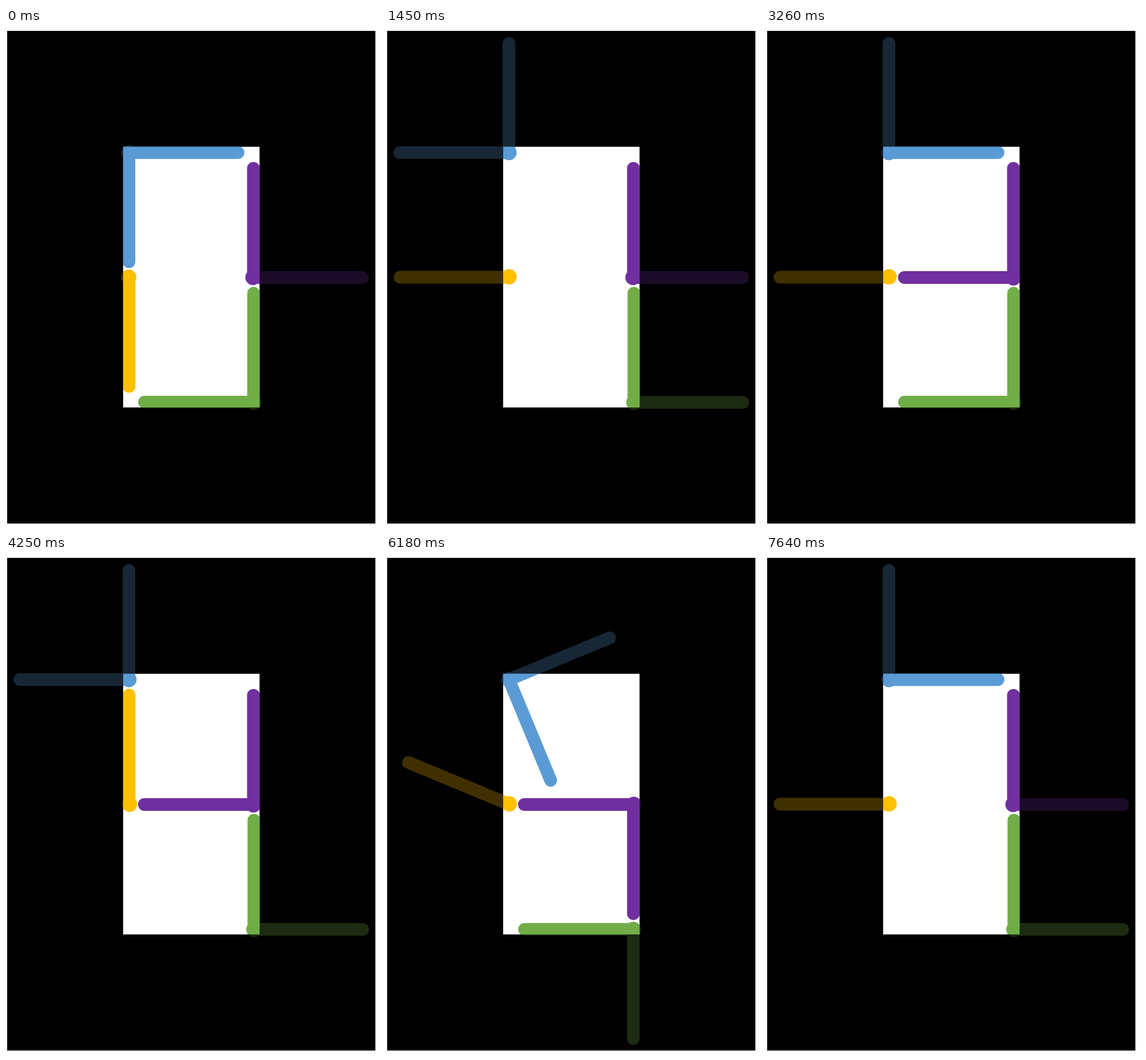
Recreate the animation shown at these times as an HTML page. Size 648 by 864 pixels, loop 8 s.

```html
<!DOCTYPE html>
<html lang="en">
<head>
<meta charset="utf-8">
<title>Rotating arm digits</title>
<style>
  html, body { margin: 0; width: 100%; height: 100%; overflow: hidden; background: #fff; }
  svg { display: block; width: 648px; height: 864px; }
  path { fill: none; stroke: currentColor; stroke-width: 22; stroke-linecap: round; stroke-linejoin: round; }
  circle { fill: currentColor; }
  .mask { fill: #000; fill-opacity: .75; stroke: none; }
</style>
</head>
<body>
<svg viewBox="0 0 648 864">
  <rect x="2" y="5" width="638" height="853"/>
  <rect x="203" y="205.5" width="236.5" height="451.5" fill="#fff"/>
  <g transform="translate(213 215.7)" color="#5b9bd5">
    <g id="blue"><path d="M0-189V0H-189"/><circle r="13.3"/></g>
  </g>
  <g transform="translate(213.3 431.5)" color="#ffc000">
    <g id="yellow"><path d="M0 0H-189"/><circle cy="-.7" r="13.3"/></g>
  </g>
  <g transform="translate(428.7 431.9)" color="#7030a0">
    <g id="purple"><path d="M0-189V0H189"/><circle cx="-.7" r="13.3"/></g>
  </g>
  <g transform="translate(429 648.3)" color="#70ad47">
    <g id="green"><path d="M.5-189V0H189"/><circle cx=".5" r="13.3"/></g>
  </g>
  <path class="mask" d="M2 5H640V858H2ZM203 205.5V657H439.5V205.5Z"/>
</svg>
<script>
const LOOP = 8000, HOLD = 40, QUARTER = 200; // ms; a quarter turn takes QUARTER
const names = ["blue", "yellow", "purple", "green"];

// Lit segments of the digits 0 to 7: a to f run clockwise from the top, g is the middle
const digits = ["abcdef", "bc", "abdeg", "abcdg", "bcfg", "acdfg", "acdefg", "abc"];

// When each new digit first shows movement
const turns = [0, 1050, 2030, 3060, 4050, 5040, 6060, 7040];

// Clockwise quarter turns that make every arm cover its share of the segments
function pose(lit) {
  const [a, b, c, d, e, f, g] = [..."abcdefg"].map(s => lit.includes(s));
  return {
    blue: !a ? 0 : e && f ? 2 : 1,
    yellow: e ? -1 : f ? 1 : 0,
    purple: !g ? 0 : b ? -1 : -2,
    green: !d ? 0 : b && c ? -1 : -2
  };
}
const poses = digits.map(pose);

// Quarter turns an arm waits so that it does not hit the purple one
function delay(name, from, to) {
  const folds = to.purple === -2 && from.purple !== -2;
  const unfolds = from.purple === -2 && to.purple !== -2;
  if (folds && name === "purple") return 2;
  if (unfolds && name === "green") return 1;
  if (unfolds && name === "blue") return 2;
  return 0;
}

function draw(t) {
  const digit = turns.findLastIndex(first => t >= first);
  const to = poses[digit], from = poses[digit - 1] || to;
  const tick = turns[digit] + Math.floor((t - turns[digit]) / HOLD) * HOLD;
  const frames = Math.round((tick - digit * 1000 - 30) * 60 / 1000);
  const done = frames * 1000 / 60 / QUARTER;
  for (const name of names) {
    const sweep = to[name] - from[name];
    const turned = Math.max(0, done - delay(name, from, to));
    const angle = 90 * (from[name] + Math.sign(sweep) * Math.min(turned, Math.abs(sweep)));
    document.getElementById(name).setAttribute("transform", `rotate(${angle})`);
  }
}

const start = performance.now();
function frame() {
  draw((performance.now() - start) % LOOP);
  requestAnimationFrame(frame);
}
frame();
</script>
</body>
</html>
```
